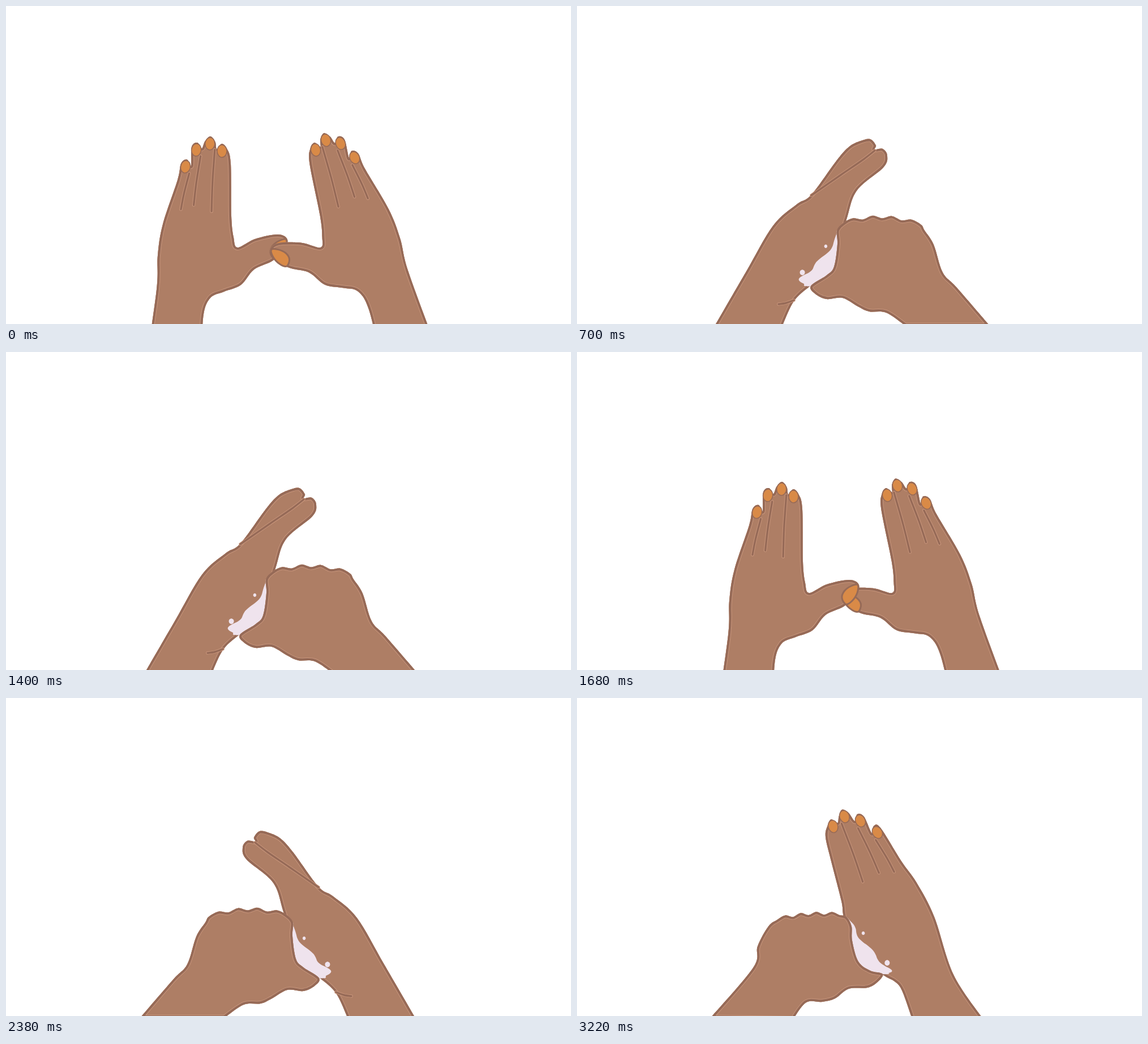
Animation, 998 px wide and 561 px high, one loop 3360 ms. Source, as an HTML page:

```html
<!DOCTYPE html>
<html lang="en">
<head>
<meta charset="utf-8">
<title>Hand washing</title>
<style>
html, body { margin: 0; width: 100%; height: 100%; overflow: hidden; background: #fff; }
svg { display: block; width: 100%; height: 100%; }
</style>
</head>
<body>
<svg id="stage" viewBox="0 0 998 561" xmlns="http://www.w3.org/2000/svg"></svg>
<script>
const SKIN = '#ae7e65', DARK = '#966a57', LIGHT = '#c8957b', NAIL = '#d98a47', FOAM = '#efe3ed';
const STEP = 140;
const { sin, cos, PI } = Math;

const pts = s => s.trim().split(/\s+/).map(p => p.split(',').map(Number));
const lerp = (a, b, t) => Array.isArray(a) ? a.map((v, i) => lerp(v, b[i], t)) : a + (b - a) * t;

function rotate([x, y], deg) {
  const a = deg * PI / 180;
  return [x * cos(a) - y * sin(a), x * sin(a) + y * cos(a)];
}
function offset([x, y], dx, dy, deg) {
  const [u, v] = rotate([dx, dy], deg);
  return [x + u, y + v];
}
const ring = (c, rx, ry, deg = 0) => Array.from({ length: 8 }, (_, i) =>
  offset(c, rx * cos(i * PI / 4), ry * sin(i * PI / 4), deg));

// Smooth curve through points.
function curve(p, closed) {
  const n = p.length, at = i => closed ? p[(i + n) % n] : p[Math.max(0, Math.min(n - 1, i))];
  let d = `M${p[0]}`;
  for (let i = 0; i < (closed ? n : n - 1); i++) {
    const [a, b, c, e] = [at(i - 1), at(i), at(i + 1), at(i + 2)];
    d += `C${b.map((v, k) => v + (c[k] - a[k]) / 6)} ${c.map((v, k) => v - (e[k] - b[k]) / 6)} ${c}`;
  }
  return d + (closed ? 'Z' : '');
}

// Evenly spaced points along a curve, so that any two outlines can blend.
function resample(p, n = 60) {
  const path = document.createElementNS('http://www.w3.org/2000/svg', 'path');
  path.setAttribute('d', curve(p));
  const len = path.getTotalLength();
  return Array.from({ length: n }, (_, i) => {
    const { x, y } = path.getPointAtLength(len * i / (n - 1));
    return [x, y];
  });
}
const blend = (a, b, t) => lerp(resample(a), resample(b), t);

// Four fingers from their tips, pinky first; the lean fans out towards the pinky.
function fingers(tips, lean) {
  const angle = i => lean + 5 * (2 - i);
  return {
    rim: tips.flatMap((t, i) => [offset(t, -9, 9, angle(i)), t, offset(t, 9, 9, angle(i))]),
    nails: tips.map((t, i) => ring(offset(t, 0, 13, angle(i)), 8.5, 11, angle(i))),
    lines: tips.slice(0, 3).map((t, i) =>
      [offset(t, 9, 23, angle(i)), offset(t, 8, 60 + 10 * i, angle(i)), offset(t, 9, 88 + 22 * i, angle(i))])
  };
}
function openPalm(outer, tips, lean, inner) {
  const f = fingers(pts(tips), lean);
  return { palm: [...pts(outer), ...f.rim, ...pts(inner)], lines: f.lines, nails: f.nails };
}

// A fist: forearm side, four knuckle bumps, edge around the other thumb, heel.
function fist(side, [a, b, arch], edge, heel) {
  const bumps = Array.from({ length: 9 }, (_, i) => {
    const [x, y] = lerp(a, b, i / 8);
    return [x, y - arch * sin(PI * i / 8) - (i % 2 ? 5 : 0)];
  });
  return { fist: [...pts(side), ...bumps, ...pts(edge), ...pts(heel)], edge: pts(edge) };
}

// Scalloped lather along the edge of the fist, with two loose bubbles.
function lather(edge) {
  const n = 18, line = resample(edge, n);
  const width = v => 42 * sin(PI * v * v) ** 0.8 + 4 * sin(17 * v) * sin(PI * v);
  const out = line.map(([x, y], i) => [x - width(Math.min(i / (n - 1), 0.97)), y]);
  const bubble = (i, r) => ring([out[i][0] - 12, out[i][1]], r, r * 1.1);
  return [[...out, ...line.map(([x, y]) => [x + 6, y]).reverse()], bubble(4, 2.8), bubble(11, 4.5)];
}

const open = openPalm('246,640 266,500 268,440 277,385 303,307',
  '320,271 338,241 361,230 381,243', 3,
  `397,278 398,370 402,408 409,426 440,411 480,403 497,412 490,432 470,450 438,465
   415,492 385,504 360,516 348,552 346,640`);
const thumbNail = pts('495,412 494,426 485,440 474,446 467,435 471,423 483,414');

const up = {
  ...openPalm('241,568 293,490 327,388 358,328 385,290',
    '434,228 463,207 490,199 509,216', 20,
    '519,247 509,290 491,360 487,388 472,450 418,490 397,502 384,518 366,568'),
  ...fist('722,566 647,478 639,440 620,405', [[604, 393], [494, 385], 4],
    '482,388 473,405 472,430 461,467 440,483 418,489',
    '427,503 445,513 478,515 502,532 525,538 553,539 576,568')
};
const bent = {
  palm: pts(`241,568 298,470 346,388 388,350 414,333 459,272 481,248 501,238 518,235 528,246
    526,253 540,252 548,264 541,285 494,326 475,380 446,470 413,493 383,521 361,568`),
  lines: [pts('526,255 504,272 466,298 414,334'), pts('383,519 369,524 356,526')],
  ...fist('729,564 671,497 646,470 630,421 614,396', [[608, 386], [470, 383], 10],
    '459,396 460,420 454,460 441,475 413,494',
    '421,508 441,517 469,515 496,530 516,539 546,541 580,564')
};
const down = {
  palm: pts(`240,568 276,532 325,483 346,448 391,393 414,371 428,362 451,361 486,365 531,377
    574,389 580,398 496,430 470,490 455,515 420,528 397,536 373,568`),
  lines: [pts('566,412 536,415 506,418 488,425'), pts('379,499 405,500 432,498 455,492')],
  ...fist('723,564 671,505 643,487 634,437 622,417', [[611, 406], [489, 408], 10],
    '482,425 482,450 475,476 463,486 439,498',
    '452,512 468,518 496,519 514,531 536,541 564,544 590,564')
};

// A picture is a list of layers: [kind, points].
const warp = (layers, f) => layers.map(([kind, p]) => [kind, p.map(f)]);
const move = (layers, dx, dy) => warp(layers, ([x, y]) => [x + dx, y + dy]);
const mirror = layers => warp(layers, ([x, y]) => [966 - x, y]);
const tag = (kind, shapes = []) => shapes.map(p => [kind, p]);

const grip = (p, foam = lather(p.edge)) => [
  ['skin', p.palm], ...tag('crease', p.lines), ...tag('nail', p.nails),
  ...tag('foam', foam), ['skin', p.fist]
];
const fold = t => grip({
  palm: blend(bent.palm, down.palm, t),
  fist: blend(bent.fist, down.fist, t),
  edge: blend(bent.edge, down.edge, t),
  lines: bent.lines.map((l, i) => blend(l, down.lines[i], t))
});

// The right hand is the left one mirrored and turned about the crook of its thumb.
function turnOver([x, y]) {
  const [u, v] = rotate([409 - x, y - 424], -12);
  return [555 + u, 424 + v];
}
const left = [['skin', open.palm], ...tag('crease', open.lines), ...tag('nail', open.nails), ['thumb', thumbNail]];
const right = warp(left, turnOver);
const closing = t => grip({ ...up, fist: blend(right[0][1], up.fist, t) }, []);

// Close, rub upright, bend, fold down and rise again.
function rub(dx, dy) {
  const upright = move(grip(up), dx, dy);
  return [
    closing(0.6), closing(0.88), upright, move(grip(bent), 0, 3), grip(bent),
    fold(0.72), fold(0.94), grip(down), fold(0.5), move(grip(bent), 0, 5), upright
  ];
}

const pictures = [
  [...left, ...right],
  ...rub(0, 0),
  move([...right, ...left], 1, -1),
  ...rub(8, -2).map(mirror)
];

let clips = 0;
const path = (d, attrs) => `<path d="${d}" ${attrs}/>`;
const stroke = (color, width) => `fill="none" stroke-linecap="round" stroke="${color}" stroke-width="${width}"`;
const paint = {
  skin(p) {
    const d = curve(p) + 'Z', id = 'c' + clips++;
    return `<clipPath id="${id}">${path(d, '')}</clipPath>` + path(d, `fill="${SKIN}"`) +
      `<g clip-path="url(#${id})">${path(d, stroke(LIGHT, 10))}${path(d, stroke(DARK, 8))}</g>`;
  },
  crease: p => path(curve(p), stroke(LIGHT, 5.4)) + path(curve(p), stroke(DARK, 3.4)),
  nail: p => path(curve(p, true), `fill="${NAIL}" stroke="${DARK}" stroke-width="1.5"`),
  thumb: p => path(curve(p, true), `fill="${NAIL}" stroke="${DARK}" stroke-width="3"`),
  foam: p => path(curve(p, true), `fill="${FOAM}"`)
};

const stage = document.getElementById('stage');
stage.innerHTML = pictures.map(layers =>
  `<g visibility="hidden">${layers.map(([kind, p]) => paint[kind](p)).join('')}</g>`).join('');
const groups = [...stage.children];
let shown = -1;

function render(ms) {
  const i = Math.floor(ms / STEP) % groups.length;
  if (i === shown) return;
  groups.forEach((g, k) => g.setAttribute('visibility', k === i ? 'visible' : 'hidden'));
  shown = i;
}

const start = performance.now();
function tick() {
  render(performance.now() - start);
  requestAnimationFrame(tick);
}
tick();
</script>
</body>
</html>
```
